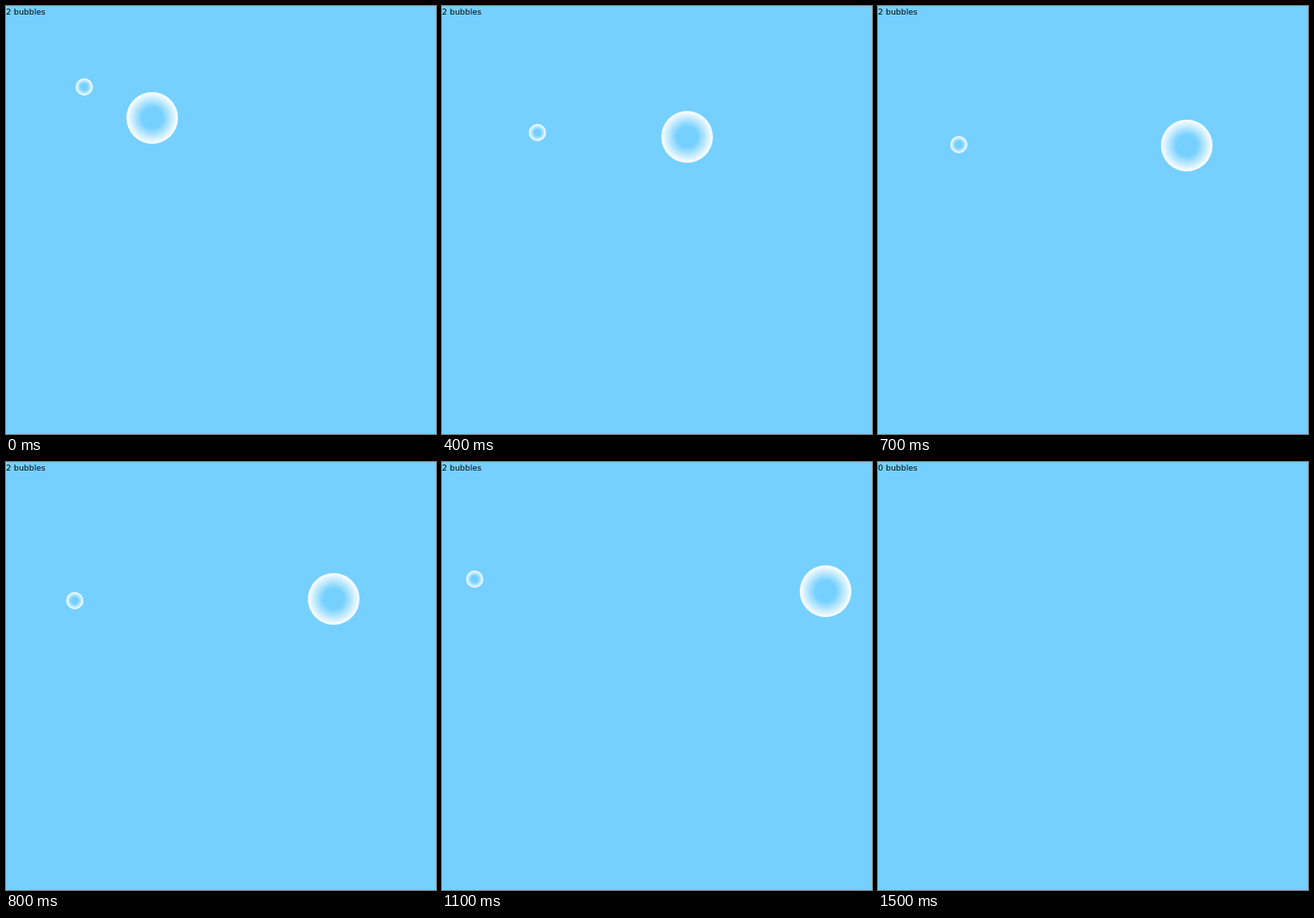
An HTML page with a canvas for the animation above (2700 ms loop, 500x497 px).

```html
<!DOCTYPE html>
<html lang="en">
<head>
<meta charset="utf-8">
<title>Bubbles</title>
<style>
  html, body { margin: 0; width: 100%; height: 100%; overflow: hidden; background: #75d0ff; }
  canvas { display: block; }
</style>
</head>
<body>
<canvas id="stage" width="500" height="497"></canvas>
<script>
const canvas = document.getElementById("stage");
const ctx = canvas.getContext("2d");
const STEP = 100, LAST = 15, LOOP = 2700;

// Both bubbles drift through waypoints at the same steps.
const steps = [0, 2, 4, 7, 10, 12, 14];
const bubbles = [
  { r: 10, xs: [91, 115, 111, 94, 48, 29, 11], ys: [94, 128, 147, 161, 151, 120, 105] },
  { r: 30, xs: [170, 232, 285, 359, 422, 470, 518], ys: [130, 144, 152, 162, 150, 152, 156] }
];

function slope(values, i) {
  const a = Math.max(i - 1, 0), b = Math.min(i + 1, steps.length - 1);
  return (values[b] - values[a]) / (steps[b] - steps[a]);
}

// Cubic Hermite curve through the waypoints
function along(values, step) {
  let i = 0;
  while (i < steps.length - 2 && step >= steps[i + 1]) i++;
  const span = steps[i + 1] - steps[i];
  const u = (step - steps[i]) / span, v = 1 - u;
  return Math.round(
    values[i] * v * v * (1 + 2 * u) + values[i + 1] * u * u * (3 - 2 * u) +
    span * u * v * (slope(values, i) * v - slope(values, i + 1) * u));
}

function drawBubble({ x, y, r }) {
  const shade = ctx.createRadialGradient(x, y, r * 0.4, x, y, r);
  shade.addColorStop(0, "rgba(255,255,255,0)");
  shade.addColorStop(1, "#fff");
  ctx.fillStyle = shade;
  ctx.beginPath();
  ctx.arc(x, y, r, 0, Math.PI * 2);
  ctx.fill();
}

function draw(ms) {
  const step = Math.min(Math.floor((ms % LOOP) / STEP), LAST);
  // A bubble that crosses a side wall has popped.
  const alive = bubbles
    .map(({ r, xs, ys }) => ({ r, x: along(xs, step), y: along(ys, step) }))
    .filter(({ x, r }) => x >= r && x <= canvas.width - r);
  ctx.fillStyle = "#75d0ff";
  ctx.fillRect(0, 0, canvas.width, canvas.height);
  alive.forEach(drawBubble);
  ctx.fillStyle = "#000";
  ctx.font = '9.4px "DejaVu Sans", sans-serif';
  ctx.fillText(alive.length + " bubbles", 0, 10);
}

let start;
function tick(now) {
  start ??= now;
  draw(now - start);
  requestAnimationFrame(tick);
}
draw(0);
requestAnimationFrame(tick);
</script>
</body>
</html>
```
